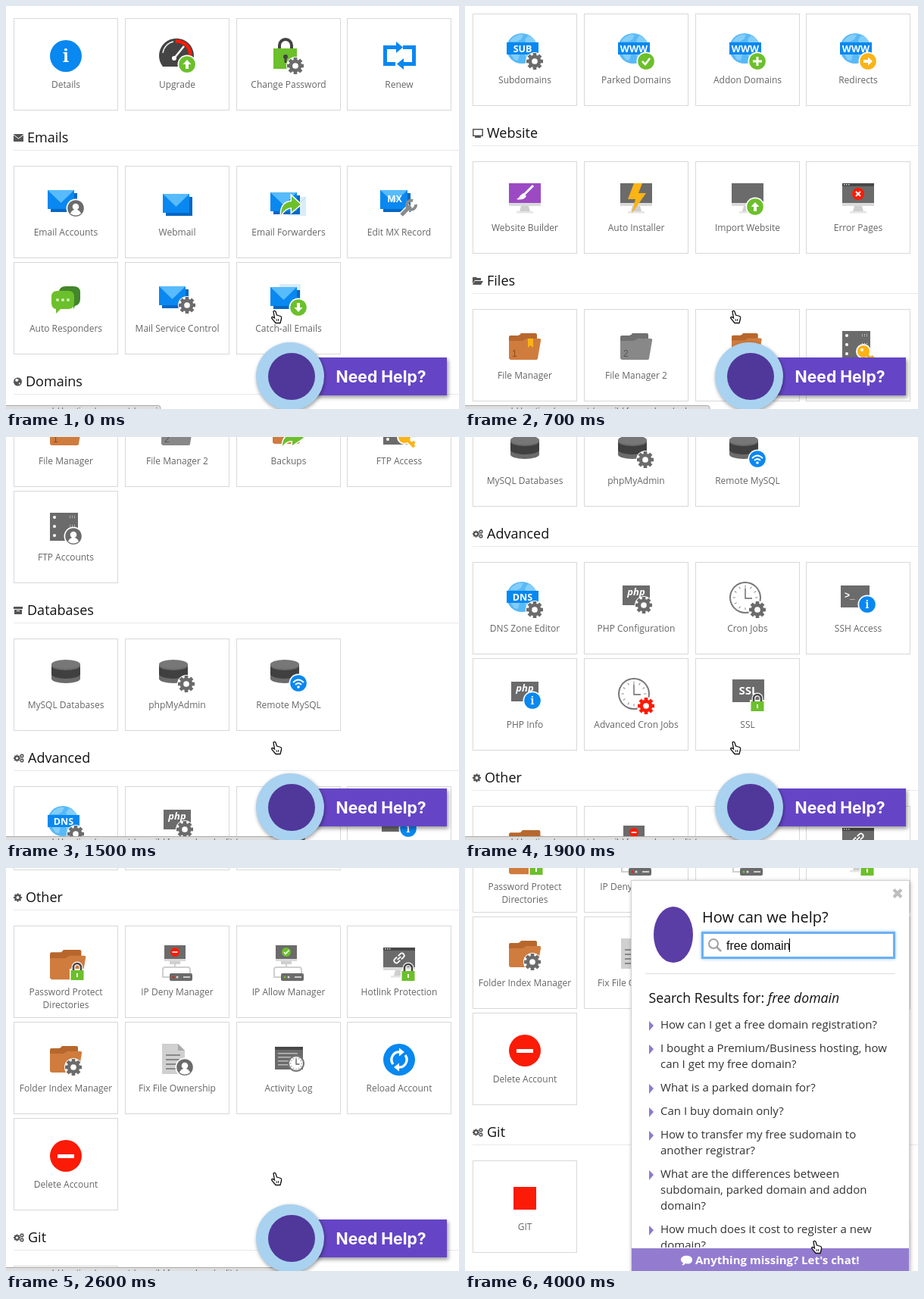
These frames come from a looping animation (598 by 532 pixels, 4.1 s). An HTML page with a canvas:

```html
<!DOCTYPE html>
<html lang="en">
<head>
<meta charset="utf-8">
<title>Control panel help</title>
<style>
html, body { margin: 0; width: 100%; height: 100%; overflow: hidden; background: #fff; }
canvas { display: block; }
</style>
</head>
<body>
<canvas id="stage" width="598" height="532"></canvas>
<script>
const ctx = document.getElementById('stage').getContext('2d');
const BLUE = '#0888f0', GREEN = '#6cc02b', GREY = '#6b6b6b', DARK = '#484848',
  RED = '#fb1b06', ORANGE = '#fcb316', PURPLE = '#6545c6', LILAC = '#937cd0';
const LOOP = 4100, STEP = 100;

// ---------- drawing helpers ----------
function box(x, y, w, h, color) { ctx.fillStyle = color; ctx.fillRect(x, y, w, h); }
function disc(x, y, r, color) {
  ctx.fillStyle = color;
  ctx.beginPath(); ctx.arc(x, y, r, 0, 7); ctx.fill();
}
function fill(path, color) { ctx.fillStyle = color; ctx.fill(new Path2D(path)); }
function stroke(path, color, width) {
  ctx.strokeStyle = color; ctx.lineWidth = width; ctx.stroke(new Path2D(path));
}
function at(x, y, draw, scale = 1) {
  ctx.save(); ctx.translate(x, y); ctx.scale(scale, scale); draw(); ctx.restore();
}
function text(s, x, y, font, color, align = 'left') {
  ctx.font = font; ctx.fillStyle = color; ctx.textAlign = align;
  ctx.fillText(s, x, y);
}
const sans = (size, style = '') => `${style} ${size}px "Open Sans", sans-serif`;
const arial = (size, style = '') => `${style} ${size}px "Liberation Sans", Arial, sans-serif`;

// ---------- icon parts; x runs from the card centre, y from the card top ----------
const glyphs = {
  up: () => fill('M0-6L5.5 0H2V6H-2V0H-5.5Z', '#fff'),
  down: () => fill('M0 6L5.5 0H2V-6H-2V0H-5.5Z', '#fff'),
  right: () => fill('M6 0L0-5.5V-2H-6V2H0V5.5Z', '#fff'),
  plus: () => stroke('M-6 0H6M0-6V6', '#fff', 3),
  check: () => stroke('M-5 0L-1 4L5-4', '#fff', 2.5),
  info: () => text('i', 0, 5, 'bold 14px "Noto Serif", serif', '#fff', 'center'),
  wifi: () => {
    stroke('M-7-1Q0-8 7-1M-4 2Q0-2 4 2', '#fff', 2);
    disc(0, 5, 1.8, '#fff');
  },
  person: () => {
    disc(0, -2, 4.3, '#fff');
    fill('M-7 7Q-6 3 0 1Q6 3 7 7Q0 12-7 7Z', '#fff');
  }
};
function badge(kind, color, x = 13, y = 61) {
  at(x, y, () => { disc(0, 0, 12.5, '#fff'); disc(0, 0, 10.8, color); glyphs[kind](); });
}
function gear(x = 13, y = 62, r = 11, color = GREY, halo = 1.5) {
  at(x, y, () => {
    if (halo) disc(0, 0, r + halo - .5, '#fff');
    for (let i = 0; i < 4; i++) {
      ctx.rotate(Math.PI / 4);
      stroke(`M${-r} 0H${r}`, color, r * .42);
    }
    disc(0, 0, r * .76, color);
    disc(0, 0, r * .35, '#fff');
  });
}
function lock(x = 12, y = 65) {
  at(x, y, () => {
    box(-10, -7, 20, 16, '#fff');
    stroke('M-5-5V-9A5 5 0 0 1 5-9V-5', '#fff', 5);
    stroke('M-5-5V-9A5 5 0 0 1 5-9V-5', DARK, 2.6);
    box(-8.5, -5, 17, 13, GREEN);
    box(-1, -1, 2, 5, '#fff');
  });
}
function envelope(x, y, w = 35) {
  box(x + 4, y + 4, w, 25, '#0867c3');
  box(x, y, w, 25, BLUE);
  fill(`M${x} ${y}H${x + w}L${x + w / 2} ${y + 17}Z`, '#58bbfb');
}
function globe(label) {
  disc(-4, 46, 20, '#58b9f8');
  fill('M-17 33Q-8 26-2 28L-5 34L-10 37H-20ZM4 29Q13 32 16 40H2L0 35ZM-18 54H-7L-9 62L-14 61ZM0 54H14Q10 62 3 64Z', '#83cef9');
  box(-24, 38, 42, 16, BLUE);
  text(label, -3, 50.5, sans(12.5, 'bold'), '#fff', 'center');
}
function stand() {
  box(-21, 55, 42, 4, '#dadada');
  fill('M-5 59H5L7 66H-7Z', '#cfcfcf');
  box(-11, 66, 22, 2.5, '#e4e4e4');
}
function monitor(color) { box(-21, 29, 42, 27, color); stand(); }
function browserWindow() {
  box(-21, 29, 42, 27, GREY); box(-21, 29, 42, 4, DARK);
  for (let x = -19; x < -10; x += 3) box(x, 30, 1.5, 1.5, '#ddd');
  stand();
}
function folder(color = '#cf7c3e', shade = '#b7672d', scale = 1) {
  at(-21, 32, () => {
    fill('M0 5Q0 3 2 3H12Q14 3 16 0H35Q37 0 37 2V33H0Z', shade);
    fill('M0 10H18L23 7H40Q43 7 42 10L38 33Q38 35 35 35H3Q0 35 0 32Z', color);
  }, scale);
}
function server() {
  box(-21, 29, 37, 37, GREY);
  for (let y = 35; y < 66; y += 12) {
    disc(-15, y, 2, '#fff');
    for (let x = 5; x < 14; x += 3) { box(x, y - 2, 1, 1, '#ddd'); box(x, y, 1, 1, '#ddd'); }
  }
}
function database(x = 0) {
  at(x, 0, () => {
    fill('M-19 34V53A19 6 0 0 0 19 53V34Z', GREY);
    fill('M-19 36V47A19 6 0 0 0 19 47V36A19 6 0 0 1-19 36Z', '#404040');
    ctx.fillStyle = '#777';
    ctx.beginPath(); ctx.ellipse(0, 34, 19, 6, 0, 0, 7); ctx.fill();
  });
}
function clock(x, y, r) {
  at(x, y, () => {
    disc(0, 0, r + 1, '#777'); disc(0, 0, r - 1, '#fff');
    for (let i = 0; i < 12; i++) {
      ctx.rotate(Math.PI / 6);
      stroke(`M0 ${-r * .82}V${-r * .66}`, '#888', 1);
    }
    stroke(`M0 ${-r * .62}V1H${r * .45}`, '#666', 1.4);
  });
}
function phpBox() {
  box(-18, 31, 36, 26, GREY);
  text('php', 0, 44, sans(13, 'italic bold'), '#fff', 'center');
}
function network(color, mark) {
  stroke('M-3 50V55H14Q17 55 17 58V63M-3 55H-16Q-19 55-19 58V68H-10', '#cfcfcf', 2);
  box(-17, 26, 28, 19, GREY); box(-17, 44, 28, 3, '#dadada');
  box(-10, 47, 14, 4, '#cfcfcf');
  disc(-3, 35, 6, color);
  stroke(mark, '#fff', 1.6);
  ctx.fillStyle = GREY;
  ctx.beginPath(); ctx.roundRect(-10, 63, 30, 10, 2); ctx.fill();
  disc(-5, 68, 1.5, color); disc(0, 68, 1.5, '#ddd'); box(8, 67, 9, 2, '#ccc');
}

const icons = {
  details() {
    disc(0, 50, 21, BLUE);
    text('i', 0, 58, 'bold 23px "Noto Serif", serif', '#fff', 'center');
  },
  upgrade() {
    fill('M-19 64A23 23 0 1 1 17 64Z', '#444');
    stroke('M-19 46A18 18 0 0 1-5 31', '#eee', 1.5);
    stroke('M-2 30.5A18 18 0 0 1 17 52', RED, 4.5);
    stroke('M-4 53L9 37', '#fff', 2.5); disc(-4, 53, 3, '#fff');
    badge('up', GREEN);
  },
  password() {
    stroke('M-12 42V36A8 8 0 0 1 4 36V42', '#444', 4);
    box(-20, 40, 31, 27, GREEN); disc(-4, 51, 3, '#444'); box(-5.5, 51, 3, 8, '#444');
    gear(9, 63);
  },
  renew() {
    stroke('M-5 60.5H-18.5V38.5H-1M5 38.5H19.5V60.5H3', BLUE, 5);
    fill('M-4 31V46L5 38.5ZM6 53V68L-3 60.5Z', BLUE);
  },
  accounts() { envelope(-24, 32); badge('person', GREY, 13, 56); },
  webmail() { envelope(-19, 37); },
  forwarders() {
    box(0, 41, 23, 25, '#d8edfa'); stroke('M0 41L11 53L23 41', '#b9dcf3', 1);
    envelope(-24, 35);
    const arrow = 'M-10 65Q-10 48 4 47V40L16 51L4 61V55Q-4 55-10 65Z';
    stroke(arrow, '#fff', 3); fill(arrow, GREEN);
  },
  mx() {
    envelope(-25, 32, 36);
    text('MX', -6, 48, sans(12, 'bold'), '#fff', 'center');
    stroke('M2 66L15 53', '#fff', 8); stroke('M3 65L15 53', '#8a8a8a', 5);
    stroke('M18 46A6 6 0 1 0 22 51', '#8a8a8a', 4);
  },
  responders() {
    fill('M-9 40Q-9 32 0 32H10Q19 32 19 40V49Q19 56 12 58L10 62V57H-9Z', '#43862b');
    fill('M-19 46Q-19 38-11 38H3Q11 38 11 46V54Q11 62 3 62H-7L-13 68V62Q-19 61-19 54Z', GREEN);
    for (let x = -11; x < 6; x += 7) disc(x, 50, 2, '#d5f5bd');
  },
  mailService() { envelope(-24, 32); gear(13, 57); },
  catchAll() { box(-12, 29, 28, 27, '#dcecf7'); envelope(-24, 33); badge('down', GREEN, 13, 60); },
  sub() { globe('SUB'); gear(13, 63); },
  parked() { globe('WWW'); badge('check', GREEN, 13, 63); },
  addon() { globe('WWW'); badge('plus', GREEN, 13, 63); },
  redirects() { globe('WWW'); badge('right', ORANGE, 13, 63); },
  builder() {
    monitor('#9b4ac4');
    stroke('M11 32L-1 44', '#fff', 3);
    fill('M-2 42L2 46Q-2 52-11 50Q-7 48-6 45Z', '#fff');
  },
  installer() { monitor(GREY); fill('M-3 29H8L3 42H13L-6 69L-1 50H-11Z', ORANGE); },
  importer() { monitor(GREY); badge('up', GREEN, 10, 60); },
  errors() {
    browserWindow(); disc(0, 43, 8, RED);
    stroke('M-3 40L3 46M3 40L-3 46', '#fff', 2);
  },
  files1() {
    folder(); fill('M4 39H11V51L7.5 48L4 51Z', ORANGE);
    text('1', -17, 63, arial(12), '#8c4c1c');
  },
  files2() { folder('#888', '#707070'); text('2', -17, 63, arial(12), '#555'); },
  backups() {
    folder('#cf7c3e', '#b7672d', .94);
    const arrow = 'M-8 68Q-8 54 5 53V47L20 57L5 67V61Q-2 60-8 68Z';
    stroke(arrow, '#fff', 3); fill(arrow, GREEN);
  },
  ftp() {
    server(); disc(7, 56, 10, '#fff'); stroke('M7 56L20 69', '#fff', 8);
    disc(7, 56, 8, ORANGE); stroke('M7 56L20 69M17 66L20 62', ORANGE, 4); disc(5, 54, 2, '#fff');
  },
  ftpAccounts() { server(); badge('person', GREY, 10, 60); },
  mysql() { database(); },
  admin() { database(-5); gear(12, 60); },
  remote() { database(-5); badge('wifi', BLUE, 13, 59); },
  dns() { globe('DNS'); gear(13, 63); },
  php() { phpBox(); gear(10, 57); },
  cron() { clock(-3, 47, 20); gear(13, 63); },
  ssh() {
    box(-23, 31, 38, 29, GREY); text('>_', -18, 48, arial(12, 'bold'), '#fff');
    badge('info', BLUE, 12, 56);
  },
  phpInfo() { phpBox(); badge('info', BLUE, 10, 56); },
  advancedCron() { clock(-3, 47, 20); gear(13, 63, 11, RED); },
  ssl() {
    box(-20, 28, 42, 30, GREY); text('SSL', 1, 48, sans(15, 'bold'), '#fff', 'center');
    lock(13, 62);
  },
  protect() { folder('#cf7c3e', '#b7672d', 1.12); lock(15, 64); },
  deny() { network(RED, 'M-6.500 35H.5'); },
  allow() { network(GREEN, 'M-6 35L-4 37.500L.5 32.500'); },
  hotlink() {
    browserWindow();
    at(0, 43, () => {
      ctx.rotate(-.75);
      stroke('M-1-3H-5A3 3 0 0 0-5 3H-1M1-3H5A3 3 0 0 1 5 3H1M-3 0H3', '#fff', 1.8);
    });
    lock();
  },
  folderIndex() { folder(); gear(10, 60); },
  ownership() {
    fill('M-20 29H1L10 38V69H-20Z', '#d0d0d0'); fill('M1 29V38H10Z', '#aaa');
    for (let y = 43; y < 66; y += 6) box(-15, y, 19, 2, '#888');
    badge('person', GREY, 10, 60);
  },
  log() {
    box(-18, 33, 37, 30, GREY); box(-18, 33, 37, 4, DARK);
    for (let y = 41; y < 60; y += 5) box(-14, y, 26, 1.5, '#bbb');
    clock(10, 55, 10);
  },
  reload() {
    disc(0, 50, 21, BLUE);
    stroke('M-8 56A10 10 0 0 1 1 40M8 44A10 10 0 0 1-1 60', '#fff', 3.3);
    fill('M0 34.500V45.500L7 40ZM0 54.500V65.500L-7 60Z', '#fff');
  },
  remove() { disc(0, 50, 21, RED); box(-11, 48, 22, 5, '#fff'); },
  git() { box(-15, 35, 30, 30, RED); }
};

// ---------- heading marks, centred on the heading line ----------
const marks = {
  mail() { box(0, -4, 13, 10, '#555'); stroke('M0-3L6.500 2L13-3', '#fff', 1); },
  world() { disc(5.5, 1, 5.5, '#555'); fill('M3-3L7-2L5 1L2 0ZM7 2L9 3L7 5Z', '#fff'); },
  screen() { ctx.strokeStyle = '#555'; ctx.lineWidth = 1.5; ctx.strokeRect(.8, -4.2, 12.4, 8.5); box(3, 5, 8, 2, '#555'); },
  folder() { fill('M0-4H5L6-3H11V0H3L0 5Z', '#555'); fill('M3 1H14L11 6H0Z', '#555'); },
  archive() { box(0, -4, 12, 3, '#555'); box(1, 0, 10, 6, '#555'); box(4, 1, 4, 1, '#fff'); },
  cogs() { gear(4.5, 1, 4.5, '#555', 0); gear(11, -2, 2.8, '#555', 0); gear(11, 4, 2.8, '#555', 0); },
  cog() { gear(5.5, 1, 5.5, '#555', 0); }
};

// ---------- page: [heading, mark, heading x, cards as "icon:label"] ----------
const sections = [
  ['', '', 0, 'details:Details,upgrade:Upgrade,password:Change Password,renew:Renew'],
  ['Emails', 'mail', 28, 'accounts:Email Accounts,webmail:Webmail,forwarders:Email Forwarders,mx:Edit MX Record,responders:Auto Responders,mailService:Mail Service Control,catchAll:Catch-all Emails'],
  ['Domains', 'world', 26, 'sub:Subdomains,parked:Parked Domains,addon:Addon Domains,redirects:Redirects'],
  ['Website', 'screen', 29, 'builder:Website Builder,installer:Auto Installer,importer:Import Website,errors:Error Pages'],
  ['Files', 'folder', 29, 'files1:File Manager,files2:File Manager 2,backups:Backups,ftp:FTP Access,ftpAccounts:FTP Accounts'],
  ['Databases', 'archive', 28, 'mysql:MySQL Databases,admin:phpMyAdmin,remote:Remote MySQL'],
  ['Advanced', 'cogs', 29, 'dns:DNS Zone Editor,php:PHP Configuration,cron:Cron Jobs,ssh:SSH Access,phpInfo:PHP Info,advancedCron:Advanced Cron Jobs,ssl:SSL'],
  ['Other', 'cog', 26, 'protect:Password Protect|Directories,deny:IP Deny Manager,allow:IP Allow Manager,hotlink:Hotlink Protection,folderIndex:Folder Index Manager,ownership:Fix File Ownership,log:Activity Log,reload:Reload Account,remove:Delete Account'],
  ['Git', 'cogs', 29, 'git:GIT']
];
const columns = [10, 157, 304, 450];

function drawCard(x, y, card) {
  const [icon, label] = card.split(':');
  ctx.strokeStyle = '#d8d8d8'; ctx.lineWidth = 1;
  ctx.strokeRect(x + .5, y + .5, 137, 121);
  at(x + 69, y, () => {
    icons[icon]();
    label.split('|').forEach((s, i) => text(s, 0, 92 + 17 * i, sans(12), '#666', 'center'));
  });
}
function drawPage(scroll) {
  let y = 16 - scroll;
  for (const [title, mark, titleX, list] of sections) {
    if (title) {
      at(10, y - 38, marks[mark]);
      text(title, titleX, y - 31, sans(18), '#111');
      box(10, y - 21, 588, 1, '#e9e9e9');
    }
    const cards = list.split(',');
    cards.forEach((card, i) => {
      const top = y + 127 * Math.floor(i / 4);
      if (top > -125 && top < 535) drawCard(columns[i % 4], top, card);
    });
    y += 127 * Math.ceil(cards.length / 4) + 68;
  }
}

function withShadow(blur, dx, dy, draw) {
  ctx.save();
  ctx.shadowColor = 'rgba(0,0,0,.38)'; ctx.shadowBlur = blur;
  ctx.shadowOffsetX = dx; ctx.shadowOffsetY = dy;
  draw(); ctx.restore();
}
function drawHelpButton() {
  withShadow(5, 2, 3, () => box(390, 464, 192, 50, PURPLE));
  withShadow(5, 1, 2, () => disc(375, 489, 45, '#a9d2f0'));
  disc(377, 489, 31, '#50389a');
  text('Need Help?', 435.5, 497, '700 21.2px Inter, sans-serif', '#fff');
}
function drawStatus(width) {
  ctx.fillStyle = '#dedede'; ctx.strokeStyle = '#a9a9a9'; ctx.lineWidth = 1;
  ctx.beginPath(); ctx.roundRect(-4, 527.5, width + 4, 12, 3); ctx.fill(); ctx.stroke();
  const path = 'panel / hosting / account / email / forwarders / edit / records';
  text(path.slice(0, Math.round(width / 6.3)), 34, 539, arial(12), '#666');
}

const articles = ['I get a "Disk full" error', 'How can I check my current DNS settings|for domain name?',
  'How can I access my Control Panel?', 'Domain is not pointing to the nameservers', 'Can I change my domain?',
  'How to cancel account?', 'How can I delete my Hosting Account or|Addon Domain?',
  'I want to create a website but I have no|technical knowledge'];
const results = ['How can I get a free domain registration?', 'I bought a Premium/Business hosting, how|can I get my free domain?',
  'What is a parked domain for?', 'Can I buy domain only?', 'How to transfer my free sudomain to|another registrar?',
  'What are the differences between|subdomain, parked domain and addon|domain?',
  'How much does it cost to register a new|domain?'];
const query = 'free domain';

function drawList(items) {
  let y = 212;
  for (const item of items) {
    fill(`M243 ${y - 10}L249 ${y - 4}L243 ${y + 3}Z`, '#8f7ace');
    for (const line of item.split('|')) { text(line, 258, y, sans(15), '#333'); y += 21; }
    y += 10;
  }
}
function drawPanel(typed, searched) {
  withShadow(6, 1, 1, () => box(220, 17, 366, 530, '#fff'));
  ctx.strokeStyle = '#d2d2d2'; ctx.lineWidth = 1; ctx.strokeRect(219.5, 16.5, 367, 530);
  stroke('M566 28.500L576 38.500M576 28.500L566 38.500', '#bdbdbd', 4);

  ctx.fillStyle = '#5b3da6';
  ctx.beginPath(); ctx.ellipse(275, 88, 26, 37, 0, 0, 7); ctx.fill();

  text('How can we help?', 313, 72, sans(20), '#111');
  ctx.save();
  ctx.shadowColor = '#8cc3f7'; ctx.shadowBlur = 4;
  ctx.strokeStyle = '#6cb0f2'; ctx.lineWidth = 3; ctx.strokeRect(313.5, 85.5, 253, 33);
  ctx.restore();
  box(315, 87, 250, 30, '#fff');
  ctx.strokeStyle = '#a2a2a2'; ctx.lineWidth = 2;
  ctx.beginPath(); ctx.arc(328, 100, 6, 0, 7); ctx.stroke();
  stroke('M332 104L338 110', '#a2a2a2', 2.5);
  if (typed) {
    const shown = query.slice(0, typed);
    text(shown, 345, 108, arial(16), '#111');
    box(345 + Math.round(ctx.measureText(shown).width) - 1, 93, 1, 18, '#111');
  }
  box(238, 139, 330, 1, '#dcdcdc');

  const title = searched ? 'Search Results for: ' : 'Popular Articles';
  text(title, 242.5, 178, sans(17.7), '#111');
  if (searched) {
    const end = 242.5 + ctx.measureText(title).width;
    text(query, end, 178, sans(17.7, 'italic'), '#111');
  }
  ctx.save();
  ctx.beginPath(); ctx.rect(220, 190, 366, 311); ctx.clip();
  drawList(searched ? results : articles);
  ctx.restore();

  box(220, 502, 366, 30, LILAC);
  fill('M285 517C285 510 300 510 300 517C300 523 294 523 291 522Q289 525 286 524Q288 523 288 521Q285 520 285 517Z', '#fff');
  text("Anything missing? Let's chat!", 304, 523, sans(15, 'bold'), '#fff');
}
function drawCursor(x, y) {
  at(x, y, () => {
    const hand = 'M3 1Q5-.5 6 1.500L7.500 6L12.500 7.500Q14 8 13.500 11L12 16.500H6L1 10.500Q0 8.500 2 8.500L4.500 10Z';
    fill(hand, '#fff'); stroke(hand, '#111', 1.3);
    stroke('M7 11L7.500 14M9.500 11V14', '#111', .9);
  });
}

// ---------- timing ----------
function track(t, keys) {
  for (let i = 1; i < keys.length; i++) {
    const [t0, a] = keys[i - 1], [t1, b] = keys[i];
    if (t < t1) return t <= t0 ? a : a + (b - a) * (t - t0) / (t1 - t0);
  }
  return keys[keys.length - 1][1];
}
const scrollKeys = [[0, 0], [700, 523], [1500, 979], [2200, 1497], [2600, 1686], [3000, 1825]];
const cursorX = [[2800, 350], [3100, 457]], cursorY = [[2800, 402], [3100, 492]];

function render(t) {
  box(0, 0, 598, 532, '#fff');
  drawPage(Math.round(track(t, scrollKeys)));
  if (t < 3100) drawStatus(t < 400 ? 204 : t < 1200 ? 323 : 376);
  drawHelpButton();
  if (t >= 3200) {
    const typed = Math.round(track(t, [[3400, 0], [3900, query.length]]));
    drawPanel(typed, t >= 4000);
  }
  drawCursor(Math.round(track(t, cursorX)), Math.round(track(t, cursorY)));
}
const start = performance.now();
function tick() {
  const elapsed = (performance.now() - start) % LOOP;
  render(Math.floor(elapsed / STEP) * STEP);
  requestAnimationFrame(tick);
}
tick();
</script>
</body>
</html>
```
